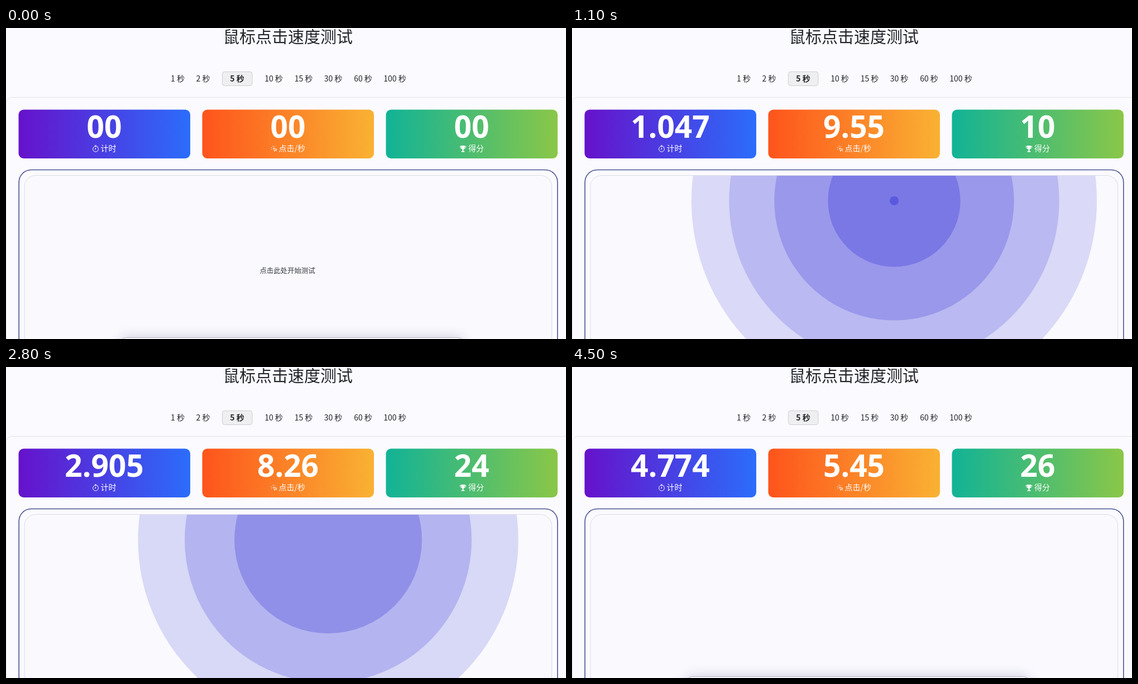
Recreate the animation shown at these times as an HTML page with a canvas. Size 1003 by 558 pixels, loop 4600 ms.

```html
<!DOCTYPE html>
<html lang="zh-CN">
<head>
<meta charset="utf-8">
<title>鼠标点击速度测试</title>
<style>
html, body { margin: 0; width: 100%; height: 100%; overflow: hidden; background: #fbfaff; }
canvas { display: block; width: 1003px; height: 558px; }
</style>
</head>
<body>
<canvas id="stage"></canvas>
<script>
const W = 1003, H = 558, LOOP = 4600, STEP = 100;
const CJK = '"Noto Sans CJK SC", "Noto Sans CJK", sans-serif';
const LATIN = '"Open Sans", "Noto Sans", sans-serif';
const canvas = document.getElementById('stage');
const ctx = canvas.getContext('2d');
const ratio = window.devicePixelRatio || 1;
canvas.width = W * ratio;
canvas.height = H * ratio;

// Loop time in ms against the seconds on the stopwatch
const CLOCK = [[0, -0.16], [100, -0.053], [700, 0.605], [1500, 1.489], [2200, 2.257],
  [2800, 2.905], [3200, 3.341], [4500, 4.774]];
const CLICKS = [0, 0.122, 0.238, 0.338, 0.455, 0.572, 0.689, 0.805, 0.922, 1.039, 1.156,
  1.289, 1.406, 1.52, 1.63, 1.74, 1.89, 2.007, 2.107, 2.224, 2.35, 2.472, 2.605, 2.722,
  2.958, 3.074];
const RIPPLE = { x: 577, y: 310, life: 30.6 };
const TABS = [['1 秒', 307.5], ['2 秒', 353], ['5 秒', 414], ['10 秒', 479.5],
  ['15 秒', 533], ['30 秒', 586], ['60 秒', 639.5], ['100 秒', 696.5]];
const CARDS = [
  { x: 22.5, from: '#6612cb', to: '#2b6dfb', label: '计时', labelX: 169.5, icon: stopwatch },
  { x: 351.5, from: '#fe541c', to: '#f9b233', label: '点击/秒', labelX: 488.5, icon: pointer },
  { x: 680.5, from: '#11b396', to: '#8ac748', label: '得分', labelX: 828, icon: trophy }
];

function clockAt(ms) {
  const i = Math.max(1, CLOCK.findIndex(p => p[0] >= ms));
  const [t0, s0] = CLOCK[i - 1], [t1, s1] = CLOCK[i];
  return s0 + (s1 - s0) * (ms - t0) / (t1 - t0);
}

function box(x, y, w, h, r) {
  ctx.beginPath();
  ctx.roundRect(x, y, w, h, r);
}

function text(str, x, y, font, color, align = 'center') {
  ctx.font = font;
  ctx.fillStyle = color;
  ctx.textAlign = align;
  ctx.fillText(str, x, y);
}

function line(...pts) {
  ctx.beginPath();
  for (let i = 0; i < pts.length; i += 2) ctx.lineTo(pts[i], pts[i + 1]);
  ctx.stroke();
}

function stopwatch() {
  ctx.beginPath();
  ctx.arc(160.5, 217.2, 4.9, 0, 7);
  ctx.stroke();
  line(158.8, 211, 162.2, 211);
  line(160.5, 211, 160.5, 212.5);
  line(164.2, 212.6, 165.2, 213.6);
  line(160.5, 214.6, 160.5, 217.4, 158.8, 217.4);
}

function pointer() {
  line(478.8, 215.3, 485.2, 217.6, 482.7, 218.6, 485.2, 221.2);
  line(478.8, 215.3, 481.2, 221.4, 482.5, 218.8);
  line(478.2, 211.2, 478.6, 213);
  line(474.6, 214.6, 476.6, 215);
  line(475.2, 218.6, 476.6, 217.4);
  line(482.2, 212, 481, 213.4);
}

function trophy() {
  ctx.beginPath();
  ctx.moveTo(815, 211);
  ctx.lineTo(822, 211);
  ctx.quadraticCurveTo(822, 217, 819.4, 218.2);
  ctx.lineTo(819.4, 220.2);
  ctx.lineTo(821.4, 221.2);
  ctx.lineTo(821.4, 222.4);
  ctx.lineTo(815.6, 222.4);
  ctx.lineTo(815.6, 221.2);
  ctx.lineTo(817.6, 220.2);
  ctx.lineTo(817.6, 218.2);
  ctx.quadraticCurveTo(815, 217, 815, 211);
  ctx.fill();
  for (const side of [-1, 1]) {
    ctx.beginPath();
    ctx.moveTo(818.5 + side * 3.5, 212.3);
    ctx.lineTo(818.5 + side * 5.4, 212.3);
    ctx.quadraticCurveTo(818.5 + side * 5.2, 216, 818.5 + side * 2.5, 216.8);
    ctx.stroke();
  }
}

function drawHeader() {
  text('鼠标点击速度测试', 505, 27.3, `400 29px ${CJK}`, '#212529');
  box(387.5, 78.5, 53.5, 25, 4);
  ctx.fillStyle = '#efeff1';
  ctx.fill();
  ctx.strokeStyle = '#cfcfd4';
  ctx.lineWidth = 1;
  ctx.stroke();
  for (const [label, x] of TABS) {
    const weight = label === '5 秒' ? 700 : 400;
    text(label, x, 95.7, `${weight} 14px ${CJK}`, '#212529');
  }
  box(0.5, 124.5, W + 40, H, 10);
  ctx.strokeStyle = '#e4e3ea';
  ctx.stroke();
}

function drawCards(values) {
  CARDS.forEach((card, i) => {
    const fill = ctx.createLinearGradient(card.x, 0, card.x + 307.5, 0);
    fill.addColorStop(0, card.from);
    fill.addColorStop(1, card.to);
    box(card.x, 146.5, 307.5, 87.5, 9);
    ctx.fillStyle = fill;
    ctx.fill();
    text(values[i], card.x + 153.5, 197, `700 55px ${LATIN}`, '#fff');
    text(card.label, card.labelX, 220.8, `400 14px ${CJK}`, '#fff', 'left');
    ctx.strokeStyle = '#fff';
    ctx.lineWidth = 1;
    card.icon();
  });
}

function drawPanel(shadow, edge) {
  ctx.save();
  if (shadow) {
    ctx.shadowColor = 'rgba(40, 30, 90, 0.22)';
    ctx.shadowBlur = 22 * ratio;
  }
  if (shadow || edge) {
    box(205.5, 555.5, 613, 60, 10);
    ctx.fillStyle = '#fafaff';
    ctx.fill();
  }
  ctx.restore();
  if (edge) {
    ctx.strokeStyle = '#b4b3bd';
    ctx.lineWidth = 1;
    ctx.stroke();
  }
}

function drawRipples(sec) {
  for (const click of CLICKS) {
    const n = (sec - click) * 60;
    if (n <= 0 || n > RIPPLE.life) continue;
    const alpha = 0.42 - 0.0158 * n + 0.00023 * n * n;
    ctx.beginPath();
    ctx.arc(RIPPLE.x, RIPPLE.y, 16.9 * n - 0.146 * n * n, 0, Math.PI * 2);
    ctx.fillStyle = `rgba(50, 48, 212, ${alpha})`;
    ctx.fill();
  }
}

function drawArea(ms, sec) {
  const idle = ms < STEP;
  box(23.2, 254.5, 964.6, 400, 22);
  ctx.strokeStyle = '#4a5590';
  ctx.lineWidth = 1.6;
  ctx.stroke();

  ctx.save();
  box(33, 264, 944.5, 400, 20);
  ctx.fillStyle = '#f9f9fe';
  ctx.fill();
  ctx.clip();
  drawPanel(idle || ms >= 3500, idle || ms >= 4300);
  if (idle) text('点击此处开始测试', 504, 439.7, `400 12.4px ${CJK}`, '#33363a');
  else drawRipples(sec);
  ctx.restore();

  box(33, 264.5, 944.5, 400, 20);
  ctx.strokeStyle = '#dcdce6';
  ctx.lineWidth = 1;
  ctx.stroke();
}

function draw(now) {
  const ms = Math.floor((now % LOOP) / STEP) * STEP;
  const sec = clockAt(ms);
  const score = CLICKS.filter(c => c <= sec).length;
  const values = sec > 0
    ? [sec.toFixed(3), (score / sec).toFixed(2), String(score)]
    : ['00', '00', '00'];
  ctx.setTransform(ratio, 0, 0, ratio, 0, 0);
  ctx.fillStyle = '#fbfaff';
  ctx.fillRect(0, 0, W, H);
  drawHeader();
  drawCards(values);
  drawArea(ms, sec);
}

const start = performance.now();
function tick() {
  draw(performance.now() - start);
  requestAnimationFrame(tick);
}
tick();
</script>
</body>
</html>
```
